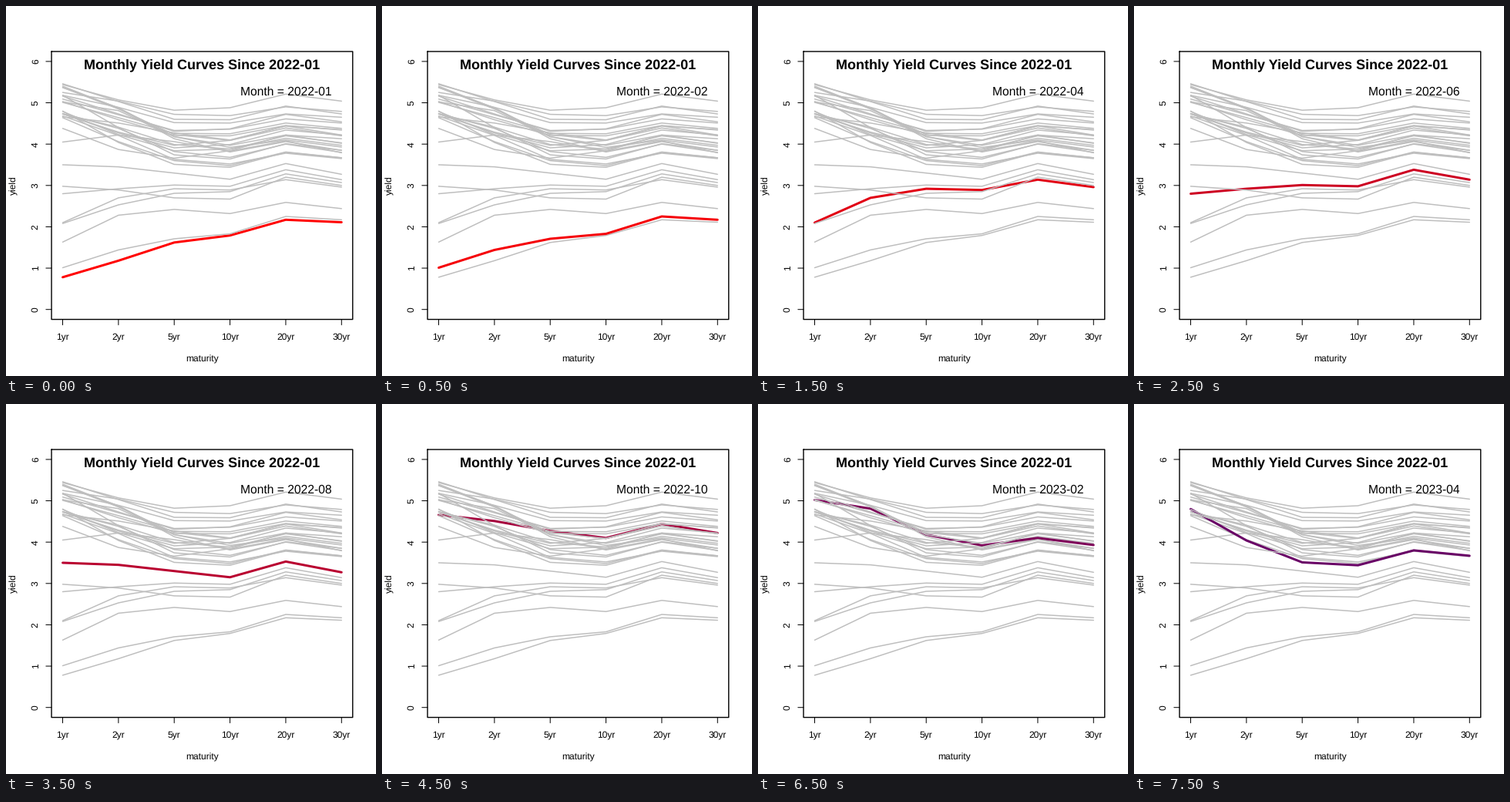
Write a matplotlib script that moves like this. It is 480x480 px and loops after 8000 ms.

```python
import matplotlib.pyplot as plt
import numpy as np
from matplotlib.animation import FuncAnimation

plt.rcParams["font.family"] = "Liberation Sans"
plt.rcParams["text.hinting"] = "none"

SIZE, DPI = 480, 72          # at 72 dpi one point is one pixel
LEFT, RIGHT, TOP, BOTTOM = 59.04, 449.76, 59.04, 406.56
FRAMES, STEP = 16, 500
TERMS = ["1yr", "2yr", "5yr", "10yr", "20yr", "30yr"]
GREY = "#bebebe"

# Month-end yields, one row per month, one column per maturity
YIELDS = {
    2022: [
        (0.78, 1.18, 1.62, 1.79, 2.17, 2.11),
        (1.01, 1.44, 1.71, 1.83, 2.25, 2.17),
        (1.63, 2.28, 2.42, 2.32, 2.59, 2.44),
        (2.10, 2.70, 2.92, 2.89, 3.14, 2.96),
        (2.08, 2.53, 2.81, 2.85, 3.28, 3.07),
        (2.80, 2.92, 3.01, 2.98, 3.38, 3.14),
        (2.98, 2.89, 2.70, 2.67, 3.20, 3.00),
        (3.50, 3.45, 3.30, 3.15, 3.53, 3.27),
        (4.05, 4.22, 4.06, 3.83, 4.08, 3.79),
        (4.66, 4.51, 4.27, 4.10, 4.44, 4.22),
        (4.74, 4.38, 3.82, 3.68, 4.00, 3.80),
        (4.73, 4.41, 3.99, 3.88, 4.14, 3.97),
    ],
    2023: [
        (4.68, 4.21, 3.63, 3.52, 3.78, 3.65),
        (5.02, 4.81, 4.18, 3.92, 4.10, 3.93),
        (4.64, 4.06, 3.60, 3.48, 3.81, 3.67),
        (4.80, 4.04, 3.51, 3.44, 3.80, 3.67),
        (5.18, 4.40, 3.74, 3.64, 4.01, 3.85),
        (5.40, 4.87, 4.13, 3.81, 4.06, 3.85),
        (5.37, 4.88, 4.18, 3.97, 4.22, 4.02),
        (5.37, 4.85, 4.23, 4.09, 4.39, 4.20),
        (5.46, 5.03, 4.60, 4.59, 4.92, 4.73),
        (5.44, 5.07, 4.82, 4.88, 5.21, 5.04),
        (5.16, 4.73, 4.31, 4.37, 4.72, 4.54),
        (4.79, 4.23, 3.84, 3.88, 4.20, 4.03),
    ],
    2024: [
        (4.73, 4.27, 3.91, 3.99, 4.34, 4.22),
        (5.01, 4.64, 4.26, 4.25, 4.51, 4.38),
        (5.03, 4.59, 4.21, 4.20, 4.45, 4.34),
        (5.25, 5.04, 4.72, 4.69, 4.90, 4.79),
        (5.18, 4.89, 4.52, 4.51, 4.73, 4.65),
        (5.09, 4.71, 4.33, 4.36, 4.61, 4.51),
        (4.73, 4.29, 3.97, 4.09, 4.44, 4.35),
        (4.38, 3.87, 3.66, 3.84, 4.22, 4.13),
    ],
}


def px(term):
    return LEFT + (term + 0.2) * (RIGHT - LEFT) / 5.4


def py(value):
    return BOTTOM - (np.asarray(value) + 0.24) * (BOTTOM - TOP) / 6.48


def stroke(xs, ys, width=1.0, color="black", cap="round", z=2):
    return ax.plot(xs, ys, color=color, lw=width, solid_capstyle=cap,
                   solid_joinstyle="round", snap=False, zorder=z)[0]


def label(x, y, s, size=12, **kw):
    return ax.text(x, y, s, fontsize=size, ha="center", va="baseline",
                   zorder=100, **kw)


def side_label(x, y, s):
    ax.text(x, y, s, fontsize=12, rotation=90, rotation_mode="anchor",
            ha="center", va="baseline", zorder=100)


fig = plt.figure(figsize=(SIZE / DPI, SIZE / DPI), dpi=DPI, facecolor="white")
ax = fig.add_axes([0, 0, 1, 1])
ax.set_xlim(0, SIZE)
ax.set_ylim(SIZE, 0)
ax.axis("off")

# Frame and axes
stroke([LEFT, RIGHT, RIGHT, LEFT, LEFT], [TOP, TOP, BOTTOM, BOTTOM, TOP], 1.4)
for i, term in enumerate(TERMS):
    stroke([px(i)] * 2, [BOTTOM, BOTTOM + 7.2])
    label(px(i), 433, term)
for v in range(7):
    stroke([LEFT - 7.2, LEFT], [py(v)] * 2)
    side_label(41.8, py(v), str(v))
label((LEFT + RIGHT) / 2, 462, "maturity")
side_label(13, (TOP + BOTTOM) / 2, "yield")
label((LEFT + RIGHT) / 2, 81, "Monthly Yield Curves Since 2022-01", 18,
      weight="bold")

# Curves stack in date order, so later months cover the highlighted one
xs = px(np.arange(len(TERMS)))
months = [(f"{year}-{m:02d}", row) for year, rows in YIELDS.items()
          for m, row in enumerate(rows, 1)]
curves = [stroke(xs, py(row), 1.5, GREY, z=10 + i)
          for i, (_, row) in enumerate(months)]
caption = label(px(4), 116, "", 15.6)


def update(k):
    for curve in curves:
        curve.set(color=GREY, linewidth=1.5)
    hot = ((255 - 10 * k) / 255, 0, 6.8 * k / 255)
    curves[k].set(color=hot, linewidth=3)
    caption.set_text(f"Month = {months[k][0]}")
    return [*curves, caption]


anim = FuncAnimation(fig, update, frames=FRAMES, interval=STEP,
                     repeat=True, repeat_delay=0, blit=False)
plt.show()
```
